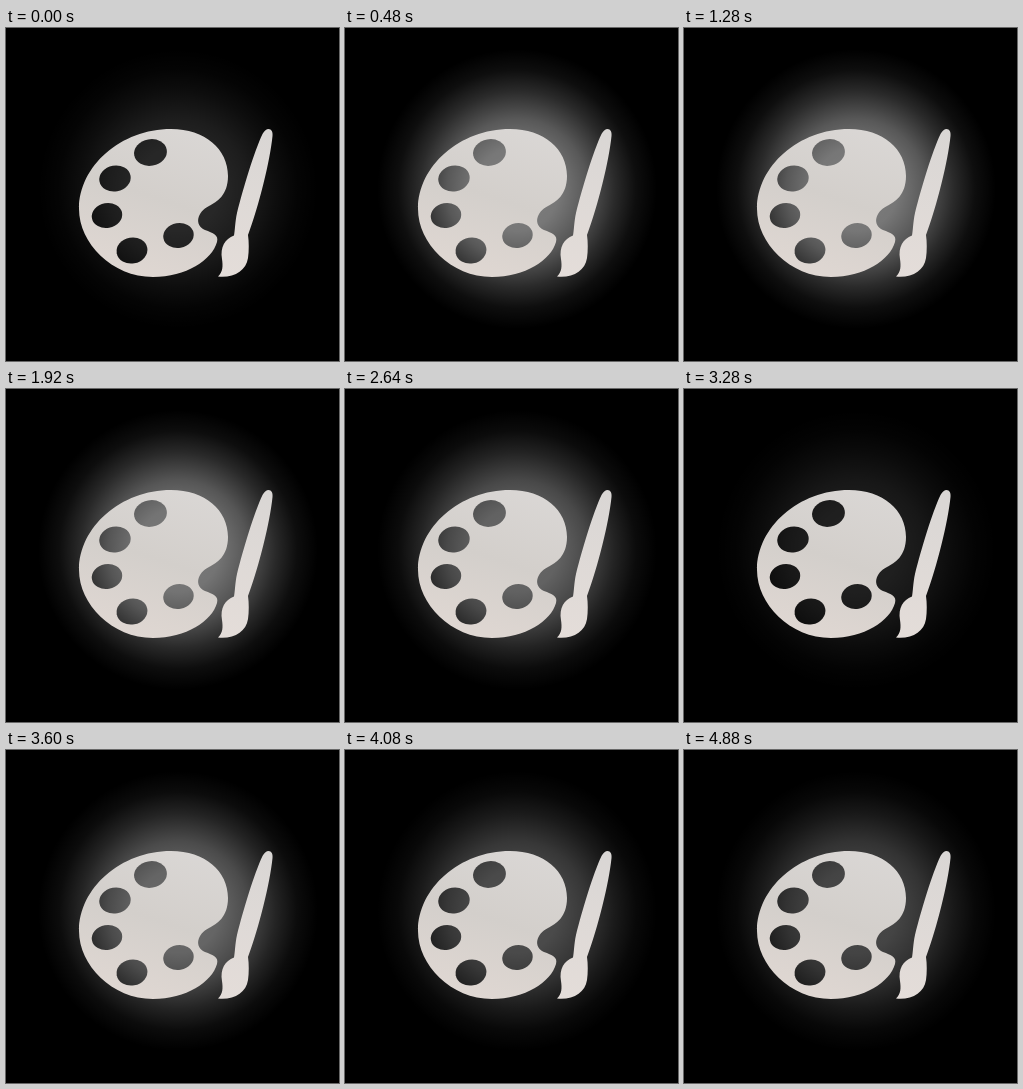
Recreate the animation shown at these times as an HTML page. Size 333 by 333 pixels, loop 4960 ms.

```html
<!DOCTYPE html>
<html lang="en">
<head>
<meta charset="utf-8">
<title>Glowing palette</title>
<style>
html, body { margin: 0; width: 100%; height: 100%; overflow: hidden; background: #000; }
svg { display: block; width: 100%; height: 100%; }
</style>
</head>
<body>
<svg viewBox="0 0 333 333" xmlns="http://www.w3.org/2000/svg">
  <defs>
    <linearGradient id="metal" gradientUnits="userSpaceOnUse" x1="190" y1="100" x2="140" y2="250">
      <stop offset="0" stop-color="#dad7d5"/>
      <stop offset=".5" stop-color="#d3cfcb"/>
      <stop offset="1" stop-color="#dfd7d2"/>
    </linearGradient>
    <linearGradient id="wood" gradientUnits="userSpaceOnUse" x1="262" y1="100" x2="225" y2="250">
      <stop offset="0" stop-color="#d9d6d4"/>
      <stop offset="1" stop-color="#e4ddd9"/>
    </linearGradient>
    <radialGradient id="halo" gradientUnits="userSpaceOnUse" cx="172" cy="161" r="140">
      <stop offset="0" stop-color="#fff"/>
      <stop offset=".3" stop-color="#fff" stop-opacity=".93"/>
      <stop offset=".5" stop-color="#fff" stop-opacity=".69"/>
      <stop offset=".7" stop-color="#fff" stop-opacity=".33"/>
      <stop offset=".85" stop-color="#fff" stop-opacity=".11"/>
      <stop offset="1" stop-color="#fff" stop-opacity="0"/>
    </radialGradient>
    <mask id="holes" maskUnits="userSpaceOnUse" x="0" y="0" width="333" height="333">
      <rect width="333" height="333" fill="#fff"/>
      <g fill="#000">
        <ellipse rx="16.500" ry="13.300" transform="translate(144.500 124.500) rotate(-10)"/>
        <ellipse rx="15.800" ry="13" transform="translate(109 150.500) rotate(-10)"/>
        <ellipse rx="15.300" ry="12.500" transform="translate(101 187.500) rotate(-10)"/>
        <ellipse rx="15.500" ry="13" transform="translate(126 222.500) rotate(-10)"/>
        <ellipse rx="15.300" ry="12.500" transform="translate(172.500 207.500) rotate(-10)"/>
      </g>
    </mask>
  </defs>
  <rect width="333" height="333"/>
  <circle id="glow" cx="172" cy="161" r="140" fill="url(#halo)"/>
  <path fill="url(#metal)" mask="url(#holes)" d="M165 101C199 101 222 121 222 148C222 167 211 174 203 178C191 184 188 197 199 202C207 205 213 207 211 214C206 232 180 249 147 249C106 249 73 215 73 181C73 138 115 101 165 101Z"/>
  <path fill="url(#wood)" d="M262.500 101C265.500 101 267 104 266.500 108C264 133 253 178 242 207C243 214 243 223 242 230C240 243 228 250 212 248.500C217 244 217 238 216 231C214 219 219 211 228 207.500C229 203 229 194 231 185C237 161 248 124 256.500 106C258.500 102.500 260.500 101 262.500 101Z"/>
</svg>
<script>
const LOOP = 4960, STEP = 80, PULSES = 6;
const TURN = 2 * Math.PI;
const wave = x => Math.cos(TURN * x);

// Six pulses per loop with a slightly uneven rhythm.
function strength(t) {
  const u = t / LOOP;
  const drift = 0.07 * wave(2 * (u - 0.62)) - 0.12 * wave(u + 0.1);
  return 0.34 - 0.21 * wave(PULSES * u + drift);
}

const glow = document.getElementById('glow');
const start = performance.now();

function draw(now) {
  const t = Math.max(0, now - start) % LOOP;
  glow.setAttribute('opacity', strength(Math.floor(t / STEP) * STEP).toFixed(4));
  requestAnimationFrame(draw);
}
draw(start);
</script>
</body>
</html>
```
